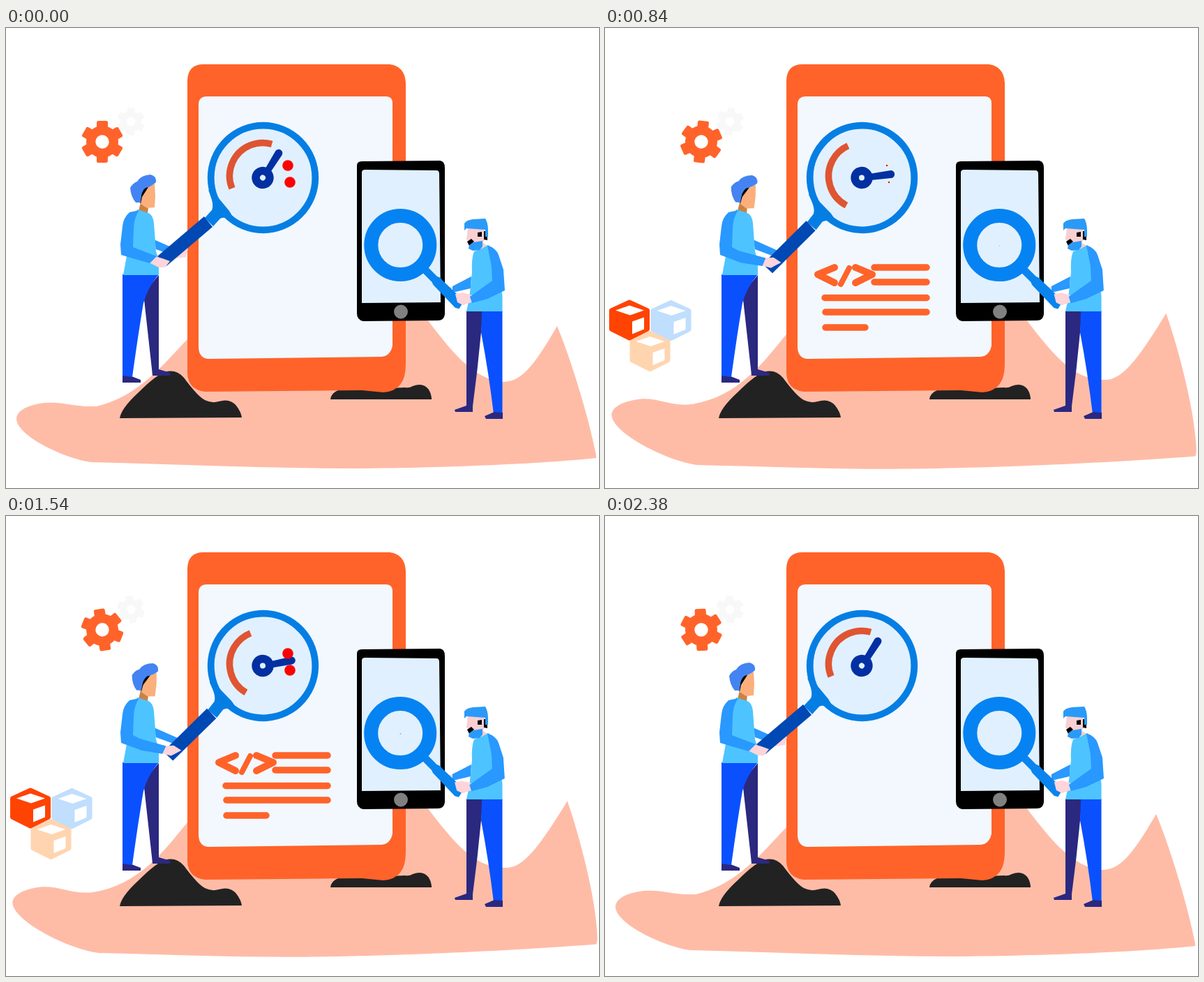
Animation, 850 px wide and 659 px high, one loop 2400 ms. Source, as an HTML page with a canvas:

```html
<!DOCTYPE html>
<html lang="en">
<head>
<meta charset="utf-8">
<title>App testing</title>
<style>
html, body { margin: 0; width: 100%; height: 100%; overflow: hidden; background: #fff; }
canvas { display: block; }
</style>
</head>
<body>
<canvas id="stage" width="850" height="659"></canvas>
<script>
const ctx = document.getElementById('stage').getContext('2d');
const LOOP = 2400, RAD = Math.PI / 180;
const ORANGE = '#ff632a', GLASS = '#e1f0fe', SLEEVE = '#2998ff', SHIRT = '#4dc4ff';
const PANTS = '#0a50ff', DARK = '#2b2880', HAND = '#fdd5da', BUG = '#df5432';

const mix = (a, b, k) => a + (b - a) * k;
const wave = (t, period) => (1 - Math.cos(2 * Math.PI * t / period)) / 2;
const ramp = (t, start, length) => Math.min(1, Math.max(0, (t - start) / length));

function fill(color, d) {
  ctx.fillStyle = color;
  ctx.fill(new Path2D(d));
}
function line(color, width, d, cap = 'round') {
  ctx.strokeStyle = color;
  ctx.lineWidth = width;
  ctx.lineCap = cap;
  ctx.lineJoin = 'round';
  ctx.stroke(new Path2D(d));
}
function disc(color, x, y, r) {
  ctx.fillStyle = color;
  ctx.beginPath();
  ctx.arc(x, y, r, 0, 7);
  ctx.fill();
}
function ring(color, width, x, y, r, from = 0, to = 360) {
  ctx.strokeStyle = color;
  ctx.lineWidth = width;
  ctx.lineCap = 'butt';
  ctx.beginPath();
  ctx.arc(x, y, r, from * RAD, to * RAD);
  ctx.stroke();
}
// Draws with the origin at x, y, then turned and scaled.
function at(x, y, degrees, scale, draw) {
  if (scale <= 0) return;
  ctx.save();
  ctx.translate(x, y);
  ctx.rotate(degrees * RAD);
  ctx.scale(scale, scale);
  draw();
  ctx.restore();
}
function turned(x, y, degrees, draw) {
  at(x, y, degrees, 1, () => { ctx.translate(-x, -y); draw(); });
}

function gear(color, x, y, angle, scale) {
  at(x, y, angle, scale, () => {
    disc(color, 0, 0, 23);
    ctx.fillStyle = color;
    for (let i = 0; i < 3; i++) {
      ctx.beginPath();
      ctx.roundRect(-8, -30, 16, 60, 2.5);
      ctx.fill();
      ctx.rotate(60 * RAD);
    }
    disc('#fff', 0, 0, 9.7);
  });
}

// Grows from the bottom corner at x, y.
function cube(color, x, y, scale) {
  at(x, y, 0, scale, () => {
    const d = 'M0-55 26-43V-16L0-3-26-16V-43Z';
    fill(color, d);
    line(color, 6, d);
    fill('#fff', 'M0-50 21-43 1-36-20-43ZM4-27 21-33V-16L4-9Z');
  });
}

function ground(m) {
  const p = (x0, y0, x1, y1) => mix(x0, x1, m) + ' ' + mix(y0, y1, m) + ' ';
  fill('#febca7', 'M260 ' + mix(446, 437, m) +
    'C225 482 190 528 ' + p(130, 542, 125, 538) +
    'C95 543 ' + p(85, 535, 80, 529) + p(55, 537, 50, 530) +
    'C' + p(28, 540, 22, 533) + p(15, 550, 8, 543) + p(15, 560, 8, 553) +
    'C' + p(16, 585, 10, 580) + p(85, 617, 90, 621) + p(122, 622, 135, 627) +
    'C' + p(250, 625, 220, 629) + p(380, 631, 300, 632) + p(500, 631, 390, 632) +
    'C' + p(640, 630, 560, 631) + p(770, 624, 750, 620) + p(846, 616, 846, 613) +
    'Q' + p(846, 615, 848, 611) + p(846, 613, 848, 600) +
    'C' + p(836, 560, 848, 545) + p(810, 475, 825, 455) + p(790, 427, 808, 404) +
    'C' + p(755, 487, 760, 482) + '738 507 ' + p(712, 507, 712, 503) +
    'C670 503 640 465 604 418L560 400H260Z');
}

function tablet() {
  fill('#222', 'M163 559Q165 545 190 522Q215 497 228 493Q243 488 255 501Q275 528 285 533Q295 538 305 535Q321 530 330 541Q337 550 338 558Z');
  fill('#222', 'M465 532Q466 523 476 519L572 515Q578 516 583 513Q598 507 606 518Q610 525 610 532Z');
  fill(ORANGE, 'M260 75Q261 52 283 52H550Q572 55 573 79V482Q573 520 541 522L510 519 285 521Q261 518 260 495Z');
  fill('#f2f8fe', 'M276 110Q276 98 288 98H545Q554 98 554 108V455Q551 470 538 471L290 474Q277 473 276 458Z');
}

function code(t) {
  if (t >= 2000) return;
  at(344, 354, 0, ramp(t, 0, 300), () => {
    line(ORANGE, 10, 'M-15-11-39-1-15 11M15-11 39-1 15 11');
    line(ORANGE, 8, 'M6-10-6 13');
  });
  const rows = [[386, 343, 75], [386, 364, 75], [315, 386.5, 146], [316, 407, 145], [316, 429, 57]];
  rows.forEach(([x, y, width], i) =>
    at(x, y, 0, ramp(t, 80 + 45 * i, 360), () => line(ORANGE, 9.5, 'M0 0H' + width)));
}

function gauge(t, m) {
  ring(BUG, 9.5, 368, 212, 47.5, 158 - 62 * m, 286 - 62 * m);
  at(368, 214.5, -57 + 77 * m, 1, () => {
    fill('#0230a2', 'M10-4 42-5.5A5.5 5.5 0 0 1 42 5.5L10 5Z');
    disc('#0230a2', 0, 0, 15.7);
    disc(GLASS, 0, 0, 4);
  });
  const size = t < 40 ? 1 : t < 1640 ? ramp(t, 720, 800) : 0;
  disc('#f00', 404, 197, 7.8 * size);
  disc('#f00', 407, 221, 7.8 * size);
}

function leftMan(t) {
  const m = wave(t, 1200);
  const p = (x0, y0, x1, y1) => mix(x0, x1, m) + ' ' + mix(y0, y1, m) + ' ';

  // Far arm and magnifier
  fill(HAND, 'M' + p(240, 320, 240, 322) + 'L' + p(261, 316, 252, 322) + p(258, 328, 250, 328) + p(244, 330, 242, 330) + 'Z');
  fill(SLEEVE, 'M212 303L' + p(246, 318, 248, 319) + p(243, 327, 244, 328) + '215 317Z');
  turned(368.5, 214.5, -6.7 * m, () => {
    disc(GLASS, 368.5, 214.5, 74);
    fill('#057ee4', 'M290 232Q299 253 295 261L285 272 297 284 307 273Q317 268 333 284L320 262 300 238Z');
    ring('#057ee4', 9.8, 368.5, 214.5, 74.8);
    fill('#0048b3', 'M284 270 296 285 230 341 217 327Z');
  });
  gauge(t, m);

  // Legs
  fill(DARK, 'M197 380 219 354 219 489 236 494 235 498H210L209 488Z');
  fill(DARK, 'M167 497 180 499 193 504V508H167Z');
  fill(PANTS, 'M167 353H219Q203 372 197 394Q190 435 181 500L167 498Z');

  // Body and near arm
  fill('#c98245', 'M193 250 204 256 203 266 190 262Z');
  fill(SHIRT, 'M188 260 204 265Q211 268 212 280L215 320 219 333V354H168L176 310Z');
  fill(HAND, 'M' + p(213, 327, 237, 331) + 'L' + p(224, 330, 251, 328) + p(235, 334, 262, 337) +
    p(228, 343, 252, 339) + p(219, 343, 248, 344) + p(205, 336, 233, 342) + 'Z');
  fill(SLEEVE, 'M191 261 177 264Q168 272 167 284L164 310 165 325 ' + p(185, 331, 200, 339) + p(206, 337, 236, 343) +
    p(216, 327, 238, 331) + p(187, 316, 195, 321) + '182 314 183 287Q184 270 191 261Z');

  // Head
  turned(195, 265, 6.5 * m, () => {
    fill('#000', 'M205 225 195 232 192 251 198 250Z');
    fill('#fbaf7b', 'M213 223 214 240 213 257 202 258 193 252 195 242 204 228Z');
    fill('#4384f2', 'M178 229Q182 222 188 220Q193 211 207 210Q216 212 215 221Q207 228 200 229Q193 234 193 250L186 250Q179 242 178 229Z');
  });
}

function phone() {
  fill('#000', 'M503 197Q503 191 510 191L622 190Q629 191 629 200V410Q628 419 619 419L512 420Q503 418 503 409Z');
  fill(GLASS, 'M510 207Q510 203 515 203L617 204Q621 204 621 209L623 393 510 394Z');
  disc('#808080', 566, 406.5, 10);
}

function bug() {
  fill(BUG, 'M-7-9Q-6-16 0-16Q6-16 7-9ZM-10-7H10V5Q8 14 0 14Q-8 14-10 5Z');
  line(BUG, 3.6, 'M-9-5-13-10M9-5 13-10M-9 1H-15M9 1H15M-8 7-13 13M8 7 13 13');
  line(GLASS, 2.6, 'M0-4V15', 'butt');
}

function rightMan(t) {
  const m = wave(t, 800);
  const p = (x0, y0, x1, y1) => mix(x0, x1, m) + ' ' + mix(y0, y1, m) + ' ';
  const x = 565.3 - 2 * m, y = 311 + 2 * m;

  // Far arm and magnifier
  fill(SLEEVE, 'M667 356L' + p(640, 370, 633, 372) + p(640, 379, 632, 382) + '666 373Z');
  fill(HAND, 'M' + p(640, 372, 633, 373) + 'L' + p(636, 370, 622, 363) + p(637, 378, 628, 378) + 'Z');
  at(x, y, 45 + 4 * m, 1, () => {
    disc(GLASS, 0, 0, 36);
    line('#0a84ee', 11, 'M48 0H74', 'butt');
    fill('#0a84ee', 'M69-5Q72-8 78-7L121-8 124 5 119 8 74 7Q69 6 69 4Z');
    ring('#0583f2', 20, 0, 0, 42);
  });
  at(x + 0.3, y + 1, 0, m, bug);

  // Legs
  fill(DARK, 'M660 405H684L681 436Q676 490 669 542V550H644L643 547 660 541Z');
  fill(PANTS, 'M682 405H711.500V553H699Q692 495 681 436Z');
  fill(DARK, 'M686 556 700 550 712 551V560H688Z');

  // Body and near arm
  turned(685, 318, -1.5 * m, () => {
    fill('#f9cfd2', 'M662 287H684L690 300 683 307 694 315 678 322 664 306 660 303Z');
  });
  fill(SHIRT, 'M691 311 682 316 671 320Q667 330 668 350L664 388 660 406H711.500V383L703 330Z');
  fill(HAND, 'M' + p(644, 381, 626, 391) + 'L' + p(655, 379, 640, 388) + p(672, 384, 656, 389) +
    p(670, 392, 656, 401) + p(655, 397, 638, 404) + p(647, 393, 630, 400) + 'Z');
  fill(SLEEVE, 'M690 311Q703 316 706 325L' + p(713, 346, 711, 346) + p(715, 376, 712, 377) +
    p(690, 388, 686, 391) + p(668, 394, 653, 400) + p(665, 385, 653, 389) + p(697, 362, 693, 363) + '696 342Z');

  // Head
  turned(685, 318, -1.5 * m, () => {
    fill('#000', 'M661 306 667 302 671 306 664 312ZM676 293 682 292V299H676ZM685 291H690V304L685 303Z');
    fill('#2a9af8', 'M657 290V280Q660 275 670 274L687 273Q691 279 691 290V299H687V289L660 287Z');
    fill('#2a9af8', 'M664 311 670 307 683 305V313L679 318 669 319 663 316Z');
  });
}

function draw(t) {
  const turn = t / LOOP * 360;
  const shown = t < 2000 ? 1 : 0;
  ctx.clearRect(0, 0, 850, 659);
  gear('#f8f8f8', 179, 134, turn, 0.66);
  gear(ORANGE, 138, 163, turn, 1);
  ground(wave(t, LOOP));
  cube('#ffd5b0', 64.5, 492, ramp(t, 0, 300) * shown);
  cube('#ff4302', 35, 447.5, ramp(t, 360, 300) * shown);
  cube('#c0defd', 94.5, 448, ramp(t, 360, 300) * shown);
  tablet();
  code(t);
  leftMan(t);
  phone();
  rightMan(t);
}

const start = performance.now();
function tick() {
  draw((performance.now() - start) % LOOP);
  requestAnimationFrame(tick);
}
tick();
</script>
</body>
</html>
```
